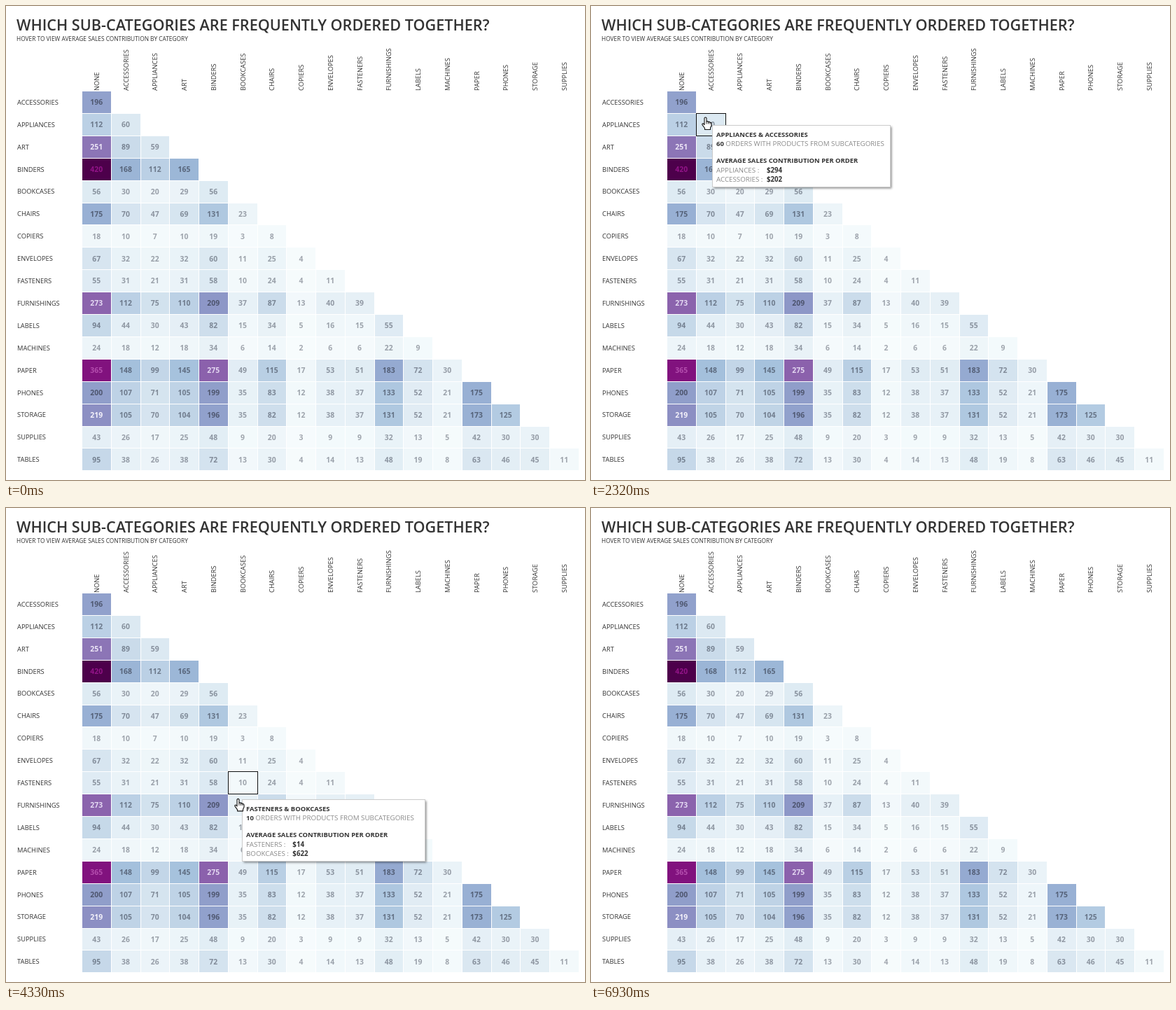
An HTML page with a canvas for the animation above (7260 ms loop, 827 by 677 pixels).

```html
<!DOCTYPE html>
<html lang="en">
<head>
<meta charset="utf-8">
<title>Sub-categories ordered together</title>
<style>
html, body { margin: 0; width: 100%; height: 100%; overflow: hidden; background: #fff; }
canvas { display: block; }
</style>
</head>
<body>
<canvas id="stage" width="827" height="677"></canvas>
<script>
const ctx = document.getElementById('stage').getContext('2d');
const LOOP = 7260, ENTER = 190, EXIT = 6200, GONE = 6930, LAG = 30;
const FAMILY = '"Open Sans", "Noto Sans", sans-serif';
const DARK = '#333', GREY = '#8a8a8a';

// Name, orders of it alone, pull towards other categories, average sales
const category = (name, alone, pull, sales) => ({ name, alone, pull, sales });
const rows = [
  category('ACCESSORIES', 196, 9.5, 202),
  category('APPLIANCES', 112, 6.35, 272),
  category('ART', 251, 9.35, 29),
  category('BINDERS', 420, 17.7, 75),
  category('BOOKCASES', 56, 3.15, 622),
  category('CHAIRS', 175, 7.4, 546),
  category('COPIERS', 18, 1.07, 2199),
  category('ENVELOPES', 67, 3.4, 64),
  category('FASTENERS', 55, 3.3, 13),
  category('FURNISHINGS', 273, 11.8, 97),
  category('LABELS', 94, 4.65, 44),
  category('MACHINES', 24, 1.9, 1412),
  category('PAPER', 365, 15.55, 59),
  category('PHONES', 200, 11.25, 382),
  category('STORAGE', 219, 11.1, 271),
  category('SUPPLIES', 43, 2.7, 238),
  category('TABLES', 95, 4.05, 668)
];
const heads = ['NONE', ...rows.slice(0, -1).map(r => r.name)];

// Column 0 is the category alone; a pair shares orders by the product of pulls
const orders = (r, c) => c ? Math.round(rows[r].pull * rows[c - 1].pull) : rows[r].alone;

// The leading category of an order sells a little above its average
const leadSales = (r, c) => Math.round(rows[r].sales * (c ? 1.08 : 1.025));

const easeOut = p => 1 - (1 - p) ** 2;
const easeBoth = p => p < 0.5 ? 4 * p ** 3 : 1 - 4 * (1 - p) ** 3;

// Pointer moves: start and end time, bend point, end point
const home = [628, 676];
const moves = [
  { t0: ENTER, t1: 880, via: [130, 240], to: [121, 131], ease: easeOut },
  { t0: 1950, t1: 2290, via: [140, 162], to: [163, 159], ease: easeBoth },
  { t0: 2910, t1: 3150, via: [184, 180], to: [205, 200], ease: easeBoth },
  { t0: 3940, t1: 4560, via: [303, 310], to: [343, 454], ease: easeOut },
  { t0: 5310, t1: 5680, via: [281, 450], to: [256, 485], ease: easeBoth },
  { t0: EXIT, t1: 6490, via: [530, 567], to: [803, 648], ease: easeBoth },
  { t0: 6690, t1: GONE, via: [816, 665], to: [830, 682], ease: easeBoth }
];

function pointer(t) {
  let from = home;
  for (const { t0, t1, via, to, ease } of moves) {
    if (t <= t0) break;
    if (t < t1) {
      const s = ease((t - t0) / (t1 - t0)), q = 1 - s;
      return from.map((v, i) => q * q * v + 2 * q * s * via[i] + s * s * to[i]);
    }
    from = to;
  }
  return from;
}

const mix = (a, b, k) => a.map((v, i) => Math.round(v + (b[i] - v) * k));
const hex = s => [0, 2, 4].map(i => parseInt(s.slice(i, i + 2), 16));
const css = c => `rgb(${c.join(',')})`;

// Colour from a row of even stops, p from 0 to 1
function gradient(stops, p) {
  const at = Math.min(1, Math.max(0, p)) * (stops.length - 1);
  const i = Math.min(stops.length - 2, Math.floor(at));
  return mix(stops[i], stops[i + 1], at - i);
}

const ramp = 'f7fcfd e0ecf4 bfd3e6 9ebcda 8c96c6 8c6bb1 88419d 810f7c 4d004b'
  .split(' ').map(hex);
const lightInk = 'f4f2fa ddccee b957b4 921388'.split(' ').map(hex);

const fillFor = n => gradient(ramp, (n - 1) / 419);

function inkFor(n) {
  if (n < 210) return mix(fillFor(n), [48, 54, 70], 0.42 + n / 200 * 0.26);
  return gradient(lightInk, (n - 230) / 190);
}

const LEFT = 109, TOP = 122, STEP_X = 41.75, STEP_Y = 31.9;
const colX = c => Math.round(LEFT + STEP_X * c);
const rowY = r => Math.round(TOP + STEP_Y * r);

function cellBox(r, c) {
  const x = colX(c), y = rowY(r);
  return [x, y, colX(c + 1) - x - 1, rowY(r + 1) - y - 1];
}

function cellAt(x, y) {
  const c = Math.floor((x - LEFT) / STEP_X), r = Math.floor((y - TOP) / STEP_Y);
  return r >= 0 && r < rows.length && c >= 0 && c <= r ? [r, c] : null;
}

// Text is placed by the middle of its capitals
function text(g, str, x, mid, size, weight, color, align = 'left') {
  g.font = `${weight} ${size}px ${FAMILY}`;
  g.fillStyle = color;
  g.textAlign = align;
  g.fillText(str, x, mid + size * 0.36);
  return g.measureText(str).width;
}

function drawChart(g) {
  g.fillStyle = '#fff';
  g.fillRect(0, 0, 827, 677);
  text(g, 'WHICH SUB-CATEGORIES ARE FREQUENTLY ORDERED TOGETHER?', 15, 27, 21.63, 600, DARK);
  text(g, 'HOVER TO VIEW AVERAGE SALES CONTRIBUTION BY CATEGORY', 15, 46.5, 8.35, 400, DARK);
  heads.forEach((name, c) => {
    g.save();
    g.translate(129.4 + STEP_X * c, 121);
    g.rotate(-Math.PI / 2);
    text(g, name, 0, 0, 9.35, 400, DARK);
    g.restore();
  });
  rows.forEach(({ name }, r) => {
    const mid = 137.5 + STEP_Y * r;
    text(g, name, 16, mid, 9.35, 400, DARK);
    for (let c = 0; c <= r; c++) {
      const n = orders(r, c);
      g.fillStyle = css(fillFor(n));
      g.fillRect(...cellBox(r, c));
      text(g, n, 129.2 + STEP_X * c, mid, 10.4, 700, css(inkFor(n)), 'center');
    }
  });
}

function drawTip(x, y, r, c) {
  const pair = c > 0;
  const name = rows[r].name, other = heads[c];
  const w = r > 2 ? 262 : 255, h = pair ? 89 : 87;
  x = Math.round(x);
  y = Math.round(y);
  ctx.save();
  ctx.shadowColor = 'rgba(0,0,0,.45)';
  ctx.shadowBlur = 3;
  ctx.shadowOffsetX = ctx.shadowOffsetY = 1.5;
  ctx.fillStyle = '#fff';
  ctx.fillRect(x, y, w, h);
  ctx.restore();
  ctx.strokeStyle = '#ccc';
  ctx.lineWidth = 1;
  ctx.strokeRect(x + 0.5, y + 0.5, w - 1, h - 1);

  const left = x + 6;
  text(ctx, pair ? `${name} & ${other}` : name, left, y + 13.2, 9.45, 700, DARK);
  const nw = text(ctx, orders(r, c), left, y + 26.8, 9.45, 700, DARK);
  text(ctx, ` ORDERS WITH PRODUCTS FROM SUBCATEGOR${pair ? 'IES' : 'Y'}`,
    left + nw, y + 26.8, 9.8, 400, GREY);
  text(ctx, 'AVERAGE SALES CONTRIBUTION PER ORDER', left, y + 50.7, 9.45, 700, DARK);

  const lines = [[name, leadSales(r, c)]];
  if (pair) lines.push([other, rows[c - 1].sales]);
  const lineY = i => y + 64.2 + 13.4 * i;
  const widths = lines.map(([label], i) =>
    text(ctx, `${label} :`, left, lineY(i), 9.75, 400, GREY));
  const valueX = left + Math.max(...widths) + 5.5;
  lines.forEach(([, v], i) =>
    text(ctx, '$' + v.toLocaleString('en-US'), valueX, lineY(i), 9.7, 700, DARK));
}

const hand = new Path2D(
  'M-1.5 1Q0 -1 1.5 1V6Q3 5 4 6.6Q5.6 5.8 6.4 7.4Q8.5 6.9 8.5 9V12L7 15V17.5H-1V15.5' +
  'L-4.6 10.6Q-5 8.4 -3 9L-1.5 10.6Z');
const knuckles = new Path2D('M1.5 6V9.5M4 6.8V9.5M6.4 7.6V9.7');

function drawHand(x, y) {
  ctx.save();
  ctx.translate(x + 0.5, y);
  ctx.fillStyle = '#fff';
  ctx.strokeStyle = '#111';
  ctx.lineJoin = 'round';
  ctx.lineWidth = 1.1;
  ctx.fill(hand);
  ctx.stroke(hand);
  ctx.lineWidth = 0.9;
  ctx.stroke(knuckles);
  ctx.restore();
}

const chart = document.createElement('canvas');
chart.width = 827;
chart.height = 677;
drawChart(chart.getContext('2d'));

function draw(t) {
  ctx.drawImage(chart, 0, 0);
  if (t < ENTER || t >= GONE) return;
  const [x, y] = pointer(t);
  // Hover state trails the pointer; the tooltip waits for a slow pointer
  const [hx, hy] = pointer(t - LAG);
  const cell = cellAt(hx, hy);
  if (cell) {
    const [bx, by, bw, bh] = cellBox(...cell);
    ctx.strokeStyle = '#111';
    ctx.lineWidth = 1;
    ctx.strokeRect(bx - 0.5, by - 0.5, bw + 1, bh + 1);
    const slow = Math.hypot(x - hx, y - hy) < 0.8 * LAG;
    if (slow && t < EXIT) drawTip(hx + 10, hy + 11, ...cell);
  }
  drawHand(x, y);
}

const start = performance.now();
function frame() {
  draw((performance.now() - start) % LOOP);
  requestAnimationFrame(frame);
}
frame();
</script>
</body>
</html>
```
